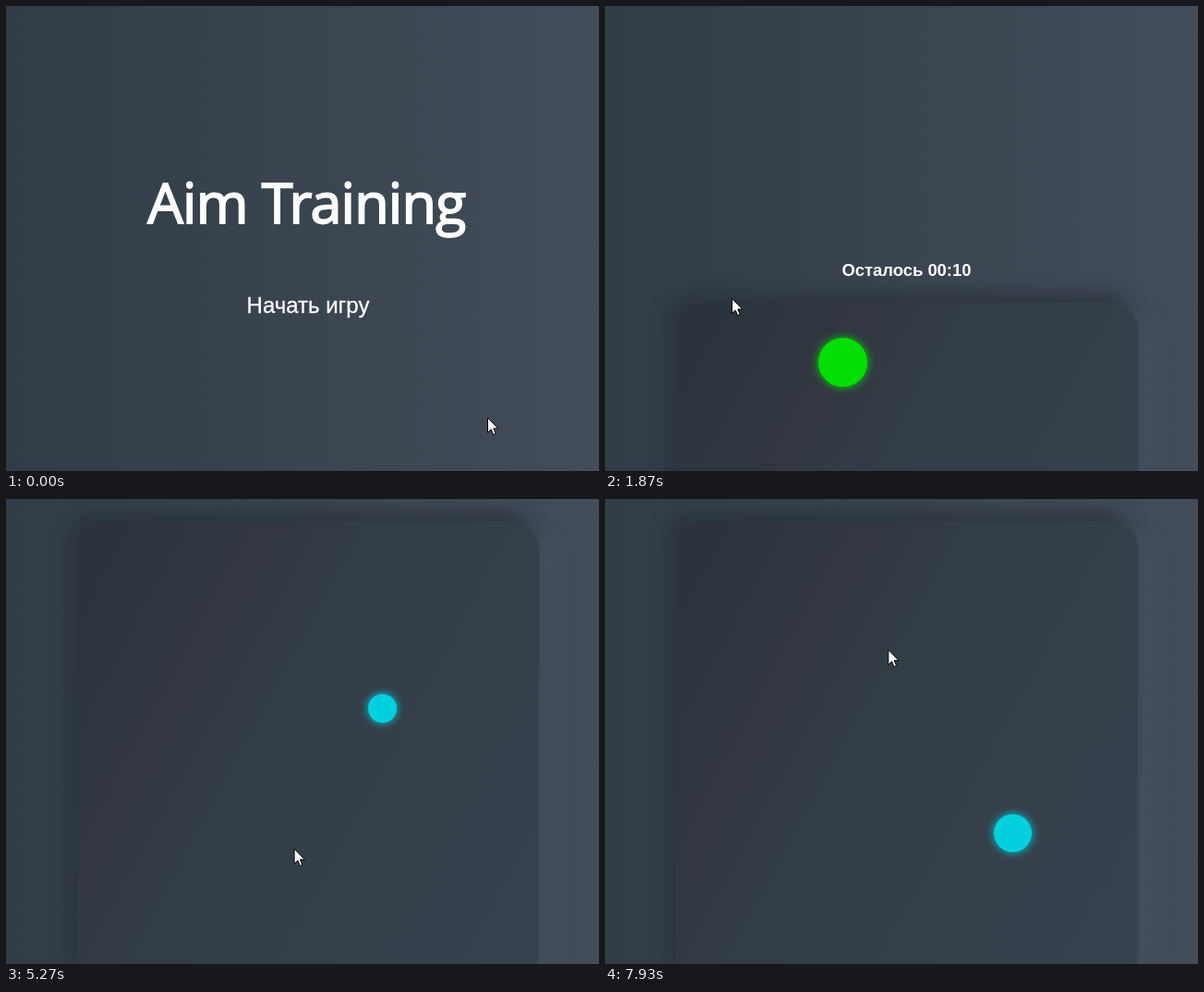
Recreate the animation shown at these times as an HTML page. Size 642 by 503 pixels, loop 8 s.

```html
<!DOCTYPE html>
<html lang="ru">
<head>
<meta charset="utf-8">
<title>Aim Training</title>
<style>
html, body { margin: 0; width: 100%; height: 100%; overflow: hidden; }
body { position: relative; background: linear-gradient(90deg, #313c46, #434d59); }
#track { position: absolute; inset: 0; --page: 950px; }
.screen { position: absolute; left: 0; width: 642px; height: 503px; }
.screen:nth-child(2) { top: var(--page); }
.screen:nth-child(3) { top: calc(2 * var(--page)); }
svg { position: absolute; left: 0; top: 0; overflow: visible; }
text { font-family: "Liberation Sans", Arial, sans-serif; fill: #fff; text-anchor: middle; }
.latin { font-family: "Open Sans", sans-serif; }
.title { font-size: 61px; letter-spacing: -.8px; stroke: #fff; stroke-width: 1.8px; }
.heading { font-size: 64px; font-weight: bold; }
.label { font-size: 24px; stroke: #fff; stroke-width: .3px; }
.label .latin { font-size: 23px; }
.timer { font-size: 18.4px; font-weight: bold; }
.button rect { fill: none; stroke: #c0c0c0; stroke-width: 2px; }
.hover, .hover .label { fill: #16d9e3; stroke: #16d9e3; }
.hover rect { stroke: #16d9e3; }
.board {
  position: absolute; left: 77px; top: 24px; width: 500px; height: 500px;
  border-radius: 30px;
  background: linear-gradient(118.38deg, #29333c, #323741 28%, #323d46 42%, #37434f);
  box-shadow: -8px -8px 20px #2a333d, 10px 7px 20px #475462;
}
.circle { position: absolute; border-radius: 50%; box-shadow: 0 0 10px currentColor; background: currentColor; }
#cursor path { stroke-linejoin: round; }
</style>
</head>
<body>
<div id="track">
  <div class="screen">
    <svg width="642" height="503">
      <text class="title latin" x="325.5" y="234.5">Aim Training</text>
      <text class="label" id="start" x="327" y="332">Начать игру</text>
    </svg>
  </div>
  <div class="screen">
    <svg width="642" height="503" id="times">
      <text class="heading" id="heading" x="327" y="210">Выберите время</text>
    </svg>
  </div>
  <div class="screen">
    <svg width="642" height="503"><text class="timer" x="326.5" y="-5">Осталось 00:10</text></svg>
    <div class="board" id="board"></div>
  </div>
</div>
<svg id="cursor" width="1" height="1">
  <path id="arrow" d="M.5 .5V16.5L4.2 13 6.7 18.7 9.2 17.6 6.8 12H11.8Z" fill="#fff" stroke="#000"/>
  <path id="hand" d="M-1.5 13V1.5Q0-1 1.5 1.5V8Q3 6.5 4.5 8.5 6 7.5 7.5 9.5 9.5 8.5 10.5 11V16L8.5 21.5H-.5L-5.5 13.5Q-5 10.5-1.5 13Z" fill="#fff" stroke="#000"/>
  <path id="beam" d="M-3-7.5H0M1-7.5H4M.5-7V7M-3 7.5H0M1 7.5H4" fill="none" stroke="#c2c5c4"/>
</svg>
<script>
const LOOP = 8000, STEP = 1000 / 15, PAGE = 950, SLIDE_MS = 500;
const GREEN = '#04dd06', YELLOW = '#e3ff00', PINK = '#b06d88', CYAN = '#02d0de';
const byId = id => document.getElementById(id);
const clamp = v => Math.min(1, Math.max(0, v));
const smooth = p => p * p * (3 - 2 * p);

// The CSS "ease" curve, solved by bisection.
function ease(x) {
  let low = 0, high = 1;
  for (let i = 0; i < 24; i++) {
    const s = (low + high) / 2;
    if (.75 * s * (1 - s) + s ** 3 < x) low = s; else high = s;
  }
  return .3 * low * (1 - low) ** 2 + 3 * low ** 2 * (1 - low) + low ** 3;
}

let left = 73;
const buttons = ['10 сек', '20 сек', '30 сек', '1 минута'].map(label => {
  const [number, unit] = label.split(' ');
  const width = unit === 'сек' ? 104 : 135;
  const button = document.createElementNS('http://www.w3.org/2000/svg', 'g');
  button.setAttribute('class', 'button');
  button.innerHTML = `<rect x="${left + 1}" y="312" width="${width - 2}" height="57"/>
    <text class="label" x="${left + width / 2}" y="346"><tspan class="latin">${number}</tspan> ${unit}</text>`;
  byId('times').append(button);
  left += width + 20;
  return button;
});

// A menu click waits for the slide; the hand rests longer before it.
const menuStop = (x, y, click) => ({ x, y, bow: 0, click, arrive: click - 220, leave: click + 300 });

// The cursor aims a little up and left of each circle's centre.
const circleStop = (x, y, r, color, click, bow = 0) =>
  ({ x: x - 4, y: y - 7, bow, click, arrive: click - 80, leave: click + 50, circle: { x, y, r, color } });

const stops = [
  menuStop(308, 327, 555),
  menuStop(137, 316, 1665),
  circleStop(257.5, 88.5, 26.7, GREEN, 2620),
  circleStop(512, 266, 13.2, YELLOW, 3870, 40),
  circleStop(304, 405, 30, PINK, 5050, 90),
  circleStop(407.5, 226.5, 15.8, CYAN, 5980),
  circleStop(428, 82, 22, GREEN, 6750),
  circleStop(114, 225, 21.2, PINK, 7434, 72),
  circleStop(441.5, 361.5, 20.8, CYAN, 8357, -144)
];

const circles = stops.flatMap(({ circle, click }, i) => {
  if (!circle) return [];
  const { x, y, r, color } = circle;
  const el = document.createElement('div');
  el.className = 'circle';
  el.style.cssText = `left:${x - r - 77}px;top:${y - r - 24}px;width:${2 * r}px;height:${2 * r}px;color:${color}`;
  byId('board').append(el);
  return [{ el, from: stops[i - 1].click, to: click }];
});

function cursorAt(t) {
  let from = { x: 521, y: 445, leave: 50 };
  for (const to of stops) {
    if (t < to.leave) {
      const m = smooth(clamp((t - from.leave) / (to.arrive - from.leave)));
      return {
        x: from.x + (to.x - from.x) * m,
        y: from.y + (to.y - from.y) * m + to.bow * Math.sin(Math.PI * m)
      };
    }
    from = to;
  }
}

function isOver(el, { x, y }, pad = 0) {
  const box = el.getBoundingClientRect();
  return x > box.left && x < box.right && y > box.top - pad && y < box.bottom + pad;
}

function render(t) {
  const [first, second] = stops.map(stop => ease(clamp((t - stop.click) / SLIDE_MS)));
  byId('track').style.transform = `translateY(${-PAGE * (first + second)}px)`;

  const tip = cursorAt(t);
  byId('cursor').style.transform = `translate(${tip.x}px, ${tip.y}px)`;

  let kind = isOver(byId('heading'), tip, 10) ? 'beam' : 'arrow';
  for (const el of [byId('start'), ...buttons]) {
    const over = isOver(el, tip);
    el.classList.toggle('hover', over);
    if (over) kind = 'hand';
  }
  for (const { el, from, to } of circles) {
    const live = t >= from && t < to;
    el.style.visibility = live ? 'visible' : 'hidden';
    if (live && isOver(el, tip)) kind = 'hand';
  }
  for (const id of ['arrow', 'hand', 'beam']) {
    byId(id).style.visibility = id === kind ? 'visible' : 'hidden';
  }
}

// The picture advances at 15 frames per second.
const started = performance.now();
function tick() {
  const time = (performance.now() - started + 6) % LOOP;
  render(Math.floor(time / STEP) * STEP);
  requestAnimationFrame(tick);
}
tick();
</script>
</body>
</html>
```
